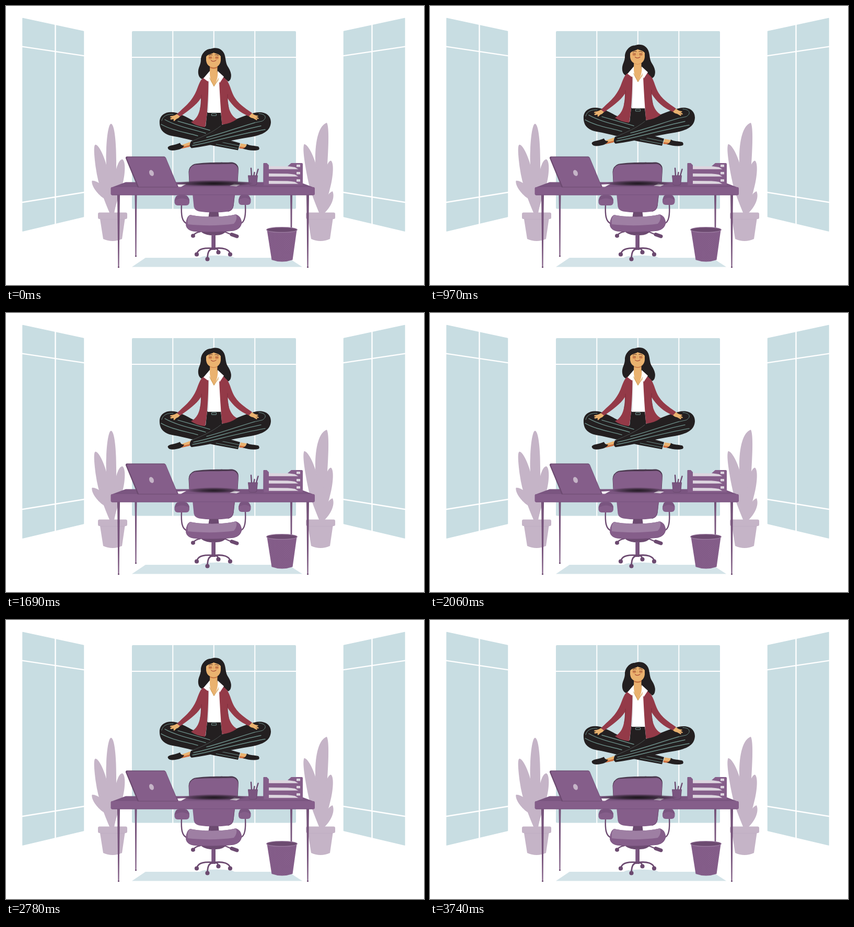
An HTML page with a canvas for the animation above (3870 ms loop, 800 px wide and 533 px high).

```html
<!DOCTYPE html>
<html lang="en">
<head>
<meta charset="utf-8">
<title>Calm office</title>
<style>
html, body { margin: 0; width: 100%; height: 100%; overflow: hidden; background: #fff; }
canvas { display: block; }
</style>
</head>
<body>
<canvas id="stage" width="800" height="533"></canvas>
<script>
const ctx = document.getElementById('stage').getContext('2d');
const LOOP = 3870, STEP = 120, STEPS = 15;
const C = {
  glass: '#c8dde2', rug: '#d3e3e8', plant: '#c5b4c7', purple: '#855e8a', shade: '#7a5580',
  deep: '#6c4a70', light: '#9e7fa3', paper: '#ddd5df', black: '#231f20', red: '#943a48',
  skin: '#eab26f', blush: '#d18450', stripe: '#6c8f89'
};

function fill(d, color) {
  ctx.fillStyle = color;
  ctx.fill(new Path2D(d));
}
function line(d, color, w, cap = 'round') {
  ctx.strokeStyle = color;
  ctx.lineWidth = w;
  ctx.lineCap = cap;
  ctx.lineJoin = 'round';
  ctx.stroke(new Path2D(d));
}
function oval(x, y, rx, ry, color, turn = 0) {
  ctx.fillStyle = color;
  ctx.beginPath();
  ctx.ellipse(x, y, rx, ry, turn, 0, 7);
  ctx.fill();
}
function box(x, y, w, h, r, color) {
  ctx.fillStyle = color;
  ctx.beginPath();
  ctx.roundRect(x, y, w, h, r);
  ctx.fill();
}
function shifted(dy, draw) {
  ctx.save();
  ctx.translate(0, dy);
  draw();
  ctx.restore();
}

function sideWindow() {
  const d = 'M32 23.5L148.5 48.5V402.5L32 430Z';
  fill(d, C.glass);
  line(d, C.glass, 1.5);
  line('M94.5 30V424M30 77.4L151 95.4M30 375.2L151 355.8', '#fff', 2.4, 'butt');
}
function windows() {
  sideWindow();
  ctx.save();
  ctx.translate(795, 0);
  ctx.scale(-1, 1);
  sideWindow();
  ctx.restore();
  box(241, 48, 314, 339.5, 2, C.glass);
  line('M319.3 47V389M397.8 47V389M476.3 47V389M240 98H556', '#fff', 2, 'butt');
}

function pot(x) {
  box(x, 394.5, 56, 12.5, 3, C.plant);
  fill(`M${x + 3.5} 404H${x + 52}L${x + 46} 445Q${x + 28} 453 ${x + 10} 445Z`, C.plant);
  line(`M${x + 5} 407.5H${x + 51}`, '#bdabc0', .7);
}
function plants() {
  fill('M201 225C208 226 211 262 211 296C211 340 214 375 206 397H200C196 350 190 305 192 275C193 245 197 225 201 225Z', C.plant);
  fill('M171 265C178 264 191 292 196 320C201 348 206 378 205 397H199C188 372 176 340 172 310C169 288 167 266 171 265Z', C.plant);
  fill('M223 293C230 297 228 327 221 347C216 366 209 380 207 397H202C203 365 206 335 210 316C213 302 218 292 223 293Z', C.plant);
  fill('M164.500 334C172 332 189 344 197 359C202 371 204 384 204 397H200C197 382 193 370 185 366C174 358 163 343 164.500 334Z', C.plant);
  pot(176);
  fill('M614 223C619 232 617 272 615 304C614 345 611 375 607 397H601C597 362 592 320 592 292C592 256 599 228 614 223Z', C.plant);
  fill('M570.500 264C579 264 593 293 598 323C603 350 606 378 606 397H600C591 375 582 354 577 328C572 302 567 273 570.500 264Z', C.plant);
  fill('M622 295.500C629 301 625 332 620 349C616 367 610 379 608 397H602C603 365 606 337 610 318C613 305 618 295 622 295.500Z', C.plant);
  fill('M625 354C630 365 623 383 608 397H602C606 377 615 357 625 354Z', C.plant);
  pot(574);
}

function leg(x, bottom, w) {
  fill(`M${x - w} 359H${x + w}L${x + w - .4} 384L${x + 1} ${bottom}H${x - 1}L${x - w + .4} 384Z`, C.deep);
  line(`M${x} 362V${bottom - 2}`, C.purple, 1);
  oval(x, bottom - 1, 1.6, 1.3, C.deep);
}

function armPad(x, y, w) {
  box(x, y + 4.5, w, 15.5, 6, C.purple);
  fill(`M${x + .5} ${y + 11}Q${x + 1} ${y} ${x + 9} ${y}H${x + w - 9}Q${x + w - 1} ${y + 1} ${x + w} ${y + 11}Q${x + w / 2} ${y + 2} ${x + .5} ${y + 11}Z`, C.shade);
}

function chair() {
  // back rest
  fill('M351 346L349.500 317Q350 306 360 302C380 298 415 299 433 298.500Q445 301 445 312L443 346Z', '#4b394f');
  fill('M351.500 346L350 318Q351 307 361 303.500C385 301 412 303 434 301.500Q443 303 444.500 313L442.500 346Z', C.purple);
  fill('M357 358H438L435.500 382Q434 391 426 392.500C410 395 385 395 370 392.500Q361 391 359.500 383Z', C.purple);
  line('M437.500 361L435 382Q433 391 425 392.500', C.deep, 1);
  fill('M389 393.500H406.500L408 406H387Z', C.deep);
  // arms
  line('M336 379C335 398 336 414 348 416', C.deep, 2.4);
  line('M458 378C459 398 458 413 448 416', C.deep, 2.4);
  armPad(322.5, 361, 28.5);
  armPad(445, 360, 23.5);
  // seat
  line('M372 431Q362 433 359 438', C.deep, 2.4);
  line('M418 431L432 437', C.deep, 2.4);
  line('M432 436.500L442 440', C.deep, 7);
  oval(358, 439, 4, 3.8, C.deep);
  fill('M371 429H423Q416 438 402 438H391Q378 437 371 429Z', C.deep);
  fill('M352 399C374 404 419 404 440 398Q449 401 451 411Q452 425 436 429C410 432 378 432 358 430Q344 427 344 416Q345 403 352 399Z', C.purple);
  fill('M352 399C374 404 419 404 440 398Q444 407 436 416C410 420 376 420 348 417Q346 406 352 399Z', C.light);
  line('M345 419Q346 428 358 430C378 432 410 432 436 429Q449 426 451 414', C.shade, 1);
  // base
  line('M397 437V466', C.shade, 7.5, 'butt');
  line('M400 437V464', C.deep, 1.5, 'butt');
  line('M396 463C381 462 368 463 365.500 473M395 464C387 465 386 474 385.500 481M399 464C405 463 406 466 406 470M399 463C416 461 427 465 429 473', C.deep, 2.8);
  for (const [x, y] of [[365, 474.5], [385.5, 483.5], [406.5, 470.5], [429, 474.5]]) oval(x, y, 4.1, 4.1, C.deep);
}

function desk() {
  fill('M229 336.500H562L590 347H201Z', C.shade);
  box(200.500, 346, 390.500, 15.5, 3, C.purple);
  line('M203 360.700H588', C.shade, 1.2);
}

function tray(y) {
  fill(`M502 ${y + 6}L552 ${y + 6.500}L564 ${y + 12}H502Z`, C.paper);
  fill(`M501 ${y + 11.800}H568V${y + 15}H501Z`, C.purple);
  fill(`M539 ${y + 6}L546 ${y}H566Q568 ${y} 568 ${y + 2}V${y + 14}H563L553 ${y + 8}Z`, C.purple);
  box(556, y + 3, 7, 4.5, .5, C.paper);
}
function deskItems() {
  // laptop
  fill('M231 287.500H303Q305 288 306 290L328.500 344Q329 346.500 327 346.500H252L229 291Q228.500 288 231 287.500Z', C.deep);
  fill('M233.500 289H303Q305 289 306 291L328.200 345.500H254L231.500 291.500Q231.500 289 233.500 289Z', C.purple);
  oval(278.500, 319, 4.2, 6, C.plant, -.42);
  // papers
  fill('M328 341L345 340L335 345.500H330Z', '#f4f0f5');
  fill('M428 343.500L437 339.500L448 341.500L441 344.500Z', C.paper);
  // pencil cup
  line('M470 324L469 310M474.500 324L475.500 318M479 324L482.500 312', C.deep, 2.4);
  fill('M463 323.500H482L480.500 339Q480 343 476 343H469Q465 343 464.500 339Z', C.deep);
  fill('M463.500 324.500H481L479.500 339Q479 342 475 342H469Q465 342 465 339Z', C.shade);
  // letter trays
  fill('M501 312H568V343.500H501Z', C.purple);
  [300, 314, 328].forEach(tray);
  fill('M493 300H499L503 304V343.500H492.500Z', C.purple);
  line('M493 301V343H568', C.shade, 1);
}

function bin() {
  fill('M499.500 428H556.500L548.500 485Q528 492 508.500 485Z', C.purple);
  ctx.save();
  ctx.clip(new Path2D('M502 434H554L547 484Q528 490 510 484Z'));
  ctx.fillStyle = 'rgba(92,58,98,.16)';
  for (let r = 0; r < 28; r++)
    for (let x = 502 + r % 2 * 2; x < 555; x += 4) ctx.fillRect(x, 433 + r * 2, 1.3, 1.2);
  ctx.restore();
  oval(528, 427.500, 30, 5.6, C.light);
  oval(528, 427.500, 28.6, 4.3, C.deep);
}

function shadow(rise) {
  const rx = 76 - 24 * rise;
  ctx.save();
  ctx.clip(new Path2D('M328 331H480V343.500H328Z'));
  ctx.translate(398, 339);
  ctx.scale(rx, 6.5 - .5 * rise);
  const g = ctx.createRadialGradient(0, 0, 0, 0, 0, 1);
  const a = 1 - .1 * rise;
  g.addColorStop(0, `rgba(26,20,26,${a})`);
  g.addColorStop(.4, `rgba(34,26,35,${a * .8})`);
  g.addColorStop(.75, `rgba(45,32,47,${a * .45})`);
  g.addColorStop(1, 'rgba(60,42,64,0)');
  ctx.fillStyle = g;
  ctx.fillRect(-1, -1, 2, 2);
  ctx.restore();
}

function hair() {
  fill('M397 80.500C407 79 415 84 418 92C421 100 420 108 424 115C429 122 432 130 430 136Q429 142 425 144C420 138 412 138 406 128L391 126C386 130 383 138 377 140C370 139 367 131 368 123C369 116 373 111 373 103C373 92 382 82 391 82Z', C.black);
}
function frontLock() {
  fill('M411 108L419 104C421 112 424 115 427 121C431 128 432 136 429 141Q427 144 425 144C422 139 418 138 416 134L409 125Z', C.black);
}
function face() {
  fill('M397.500 89C401 91 407 91 411 96V104C410 113 404 117.500 397 117.500C389 117 384 112 383 104V97C386 92 394 92 397.500 89Z', C.skin);
  oval(391, 99, 3.4, 2.7, C.blush);
  oval(403.500, 99, 3.4, 2.7, C.blush);
  line('M388.500 94.500Q391.500 92.500 395 93.500M400 93.500Q403 92.500 406.500 94.500', '#6f3f2b', 1.1);
  line('M388.500 97.500Q391 99.200 393.500 97.500M401 97.500Q403.500 99.200 406 97.500', '#8c5138', .8);
  line('M397 97V101', '#dc9d5c', .8);
  line('M392.500 104Q397 107.500 402 103.800', '#a84a35', 1.2);
}

function trousers() {
  fill('M385 203H411L415 240H381Z', C.black);
  // leg from the left knee
  fill('M386 231C360 222 345 210 326 204C309 200 296 206 294 219C293 236 301 245 319 248.500C345 253 372 261 398 267L444 275.500L448 262L412 252Z', C.black);
  line('M329 220L390 237.500M304 217C325 229 352 234 382 243M297 226C318 238 343 241 367 248', C.stripe, 1.4);
  line('M320 207C309 206 300 210 298 219', C.stripe, 1);
  line('M412 260L446 267M402 264L443 272', C.stripe, 1);
  // leg from the right knee
  fill('M411 228C432 220 455 209 476 204C493 200 507 207 507 222C506 240 490 246 470 250C430 256 392 267 355 271.500Q349 268 354 258.500C376 250 396 240 411 228Z', C.black);
  line('M357 266.500C395 260 435 247 496 236M359 262C400 253 440 239 488 229M384 251C415 243 445 232 476 223', C.stripe, 1.4);
  line('M484 205.500C498 206 500 215 490 220L476 223', C.stripe, 1);
  line('M411 229C396 241 376 250 355 258.500', '#55605e', .8);
  line('M394.500 205.500H401.500Q402.500 205.500 402.500 206.500V208.500Q402.500 209.500 401.500 209.500H394.500Q393.500 209.500 393.500 208.500V206.500Q393.500 205.500 394.500 205.500Z', C.stripe, 1.1);
}

function feet() {
  fill('M332 267L353 259.500L351.500 268.500L336 272Z', C.skin);
  fill('M336 269.500L352 265.500L351.500 269L336 272.500Z', '#cf7040');
  fill('M309.500 270.500C311 265.500 323 266.500 333 261.500Q335 267.500 341 266.500C339 272 331 275.500 318 276Q310 275.500 309.500 270.500Z', C.black);
  fill('M449 262.500L461 264.500L460 273L446.500 271.500Z', C.skin);
  fill('M447 268.500L460 270.500L459 273.500L446.500 272Z', '#cf7040');
  fill('M461 263.500C466 267.500 476 266.500 483 268.500Q486 271.500 484 274.500C475 277.500 463 275.500 453 272.500Q460 270.500 461 263.500Z', C.black);
}

function torso() {
  fill('M387 138L398 144L409 138L411.500 204H386Z', '#fff');
  line('M387.500 146L387 202', '#cfd3d8', 1);
  fill('M390.500 113H404.500V125L408 140L398 153.500L389 138L390 125Z', C.skin);
  fill('M390.500 115H404.500V118Q397 122 390.500 118Z', '#c47442');
  // cardigan
  fill('M378 137C370 142 368 155 363 165C354 184 343 191 327 207L333 211.500C350 199 364 190 373 176C373 190 371 201 367 209Q362 218 354 222Q365 230 381 231.500C384 219 387 190 387.500 144Z', C.red);
  fill('M416 136C425 141 428 152 432 163C439 182 450 190 471 204.500L465 211C447 203 434 192 424 176C424 190 428 201 432 207Q436 213 442 216Q430 225 413.500 226.500C412 210 410 185 408 144Z', C.red);
  line('M374 170Q375 184 372 196M424 169Q423 181 426 195', '#7b2e3b', .9);
}

function collar() {
  fill('M390 124L378 138L386 144L390 139L398 153.500Q389 141 390 124Z', '#fff');
  fill('M405 124L417 135L409 147L406.500 140L398 153.500Q407 138 405 124Z', '#fff');
  line('M389.500 137L398 153.500L407 138', '#b9852f', .7);
}

function hands() {
  fill('M327 206.500L333 211Q330 215 326 216L322 220L320.500 219L321 216L315.500 217L314 215L318 213L313.500 212.500L315 210.500Q322 210 327 206.500Z', C.skin);
  fill('M471 204.500L465 210.500Q468 214 473 214.500L480 218.500L481 216L477 213.500L483 216L484 214.500L479.500 211.500L483 211L482 209.500Q475 209 471 204.500Z', C.skin);
}

const ease = k => (1 - Math.cos(Math.PI * k / STEPS)) / 2;

// Heights from 0 (low) to 1 (high); the head trails the body on the way up.
function heights(t) {
  if (t < 250) return [0, 0];
  if (t < 2060) {
    const k = Math.min(14, Math.floor((t - 250) / STEP) + 1);
    return [ease(k + 1), ease(k)];
  }
  const h = ease(STEPS - Math.min(STEPS, Math.floor((t - 2060) / STEP) + 1));
  return [h, h];
}

function woman(body, head) {
  const by = -15.5 * body, hy = -14.3 * head;
  shifted(hy, hair);
  shifted(by, () => { feet(); trousers(); torso(); hands(); });
  shifted(hy, frontLock);
  shifted(by, collar);
  shifted(hy, face);
}

function room() {
  ctx.fillStyle = '#fff';
  ctx.fillRect(0, 0, 800, 533);
  windows();
  fill('M267 481H540L567 498.500H241Z', C.rug);
  oval(404, 482, 34, 5.5, C.rug);
  plants();
  leg(248.500, 479, 2);
  leg(546, 470, 2);
  chair();
  bin();
  leg(215.500, 500, 2.5);
  leg(577.500, 500, 2.5);
  desk();
  deskItems();
}

const backdrop = document.createElement('canvas');
backdrop.width = 800;
backdrop.height = 533;
room();
backdrop.getContext('2d').drawImage(ctx.canvas, 0, 0);

const start = performance.now();
function frame() {
  const t = (performance.now() - start) % LOOP;
  const [body, head] = heights(t);
  ctx.drawImage(backdrop, 0, 0);
  shadow(body);
  woman(body, head);
  requestAnimationFrame(frame);
}
frame();
</script>
</body>
</html>
```
